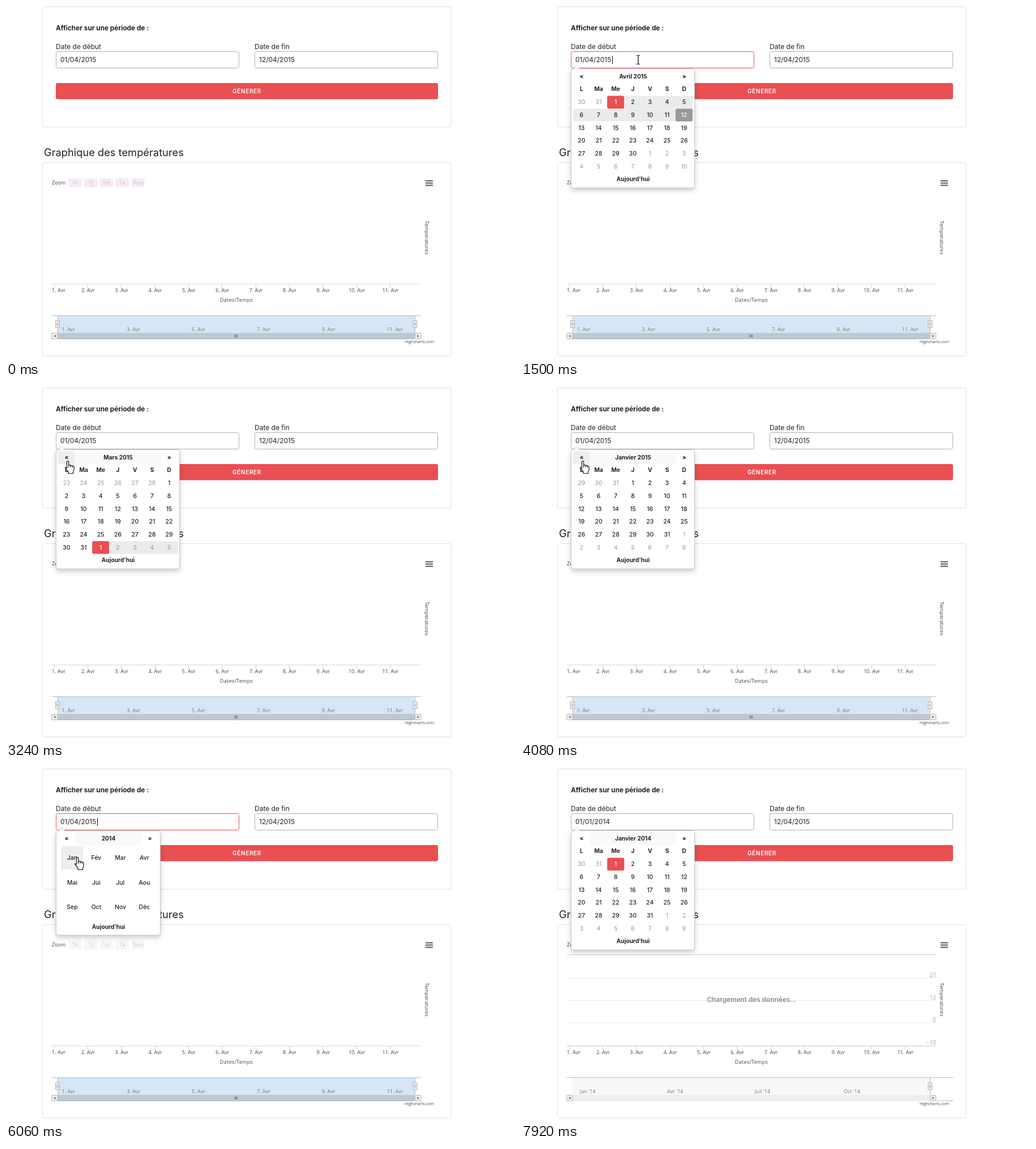
Recreate the animation shown at these times as an HTML page. Size 899x623 px, loop 8 s.

```html
<!DOCTYPE html>
<html lang="fr">
<head>
<meta charset="utf-8">
<title>Graphique des températures</title>
<style>
html, body { margin: 0; width: 100%; height: 100%; overflow: hidden; background: #fff; }
svg { display: block; font: 12px Inter, sans-serif; fill: #222; }
.mid { text-anchor: middle; }
.end { text-anchor: end; }
.bold { font-weight: 700; }
.title { font-size: 18.3px; }
.button { font-size: 10px; font-weight: 600; letter-spacing: .7px; fill: #fff; }
.chart { font: 9px "Open Sans", sans-serif; fill: #444; }
.wide { letter-spacing: .3px; }
.tiny { font-size: 7.1px; }
.nav { fill: #777; }
.value { font-size: 10px; fill: #aaa; }
.loading { font-size: 11.8px; font-weight: 600; fill: #8a8a8a; }
.day { font-size: 10.5px; font-weight: 500; }
.head { font-size: 10.2px; font-weight: 700; }
.dim { fill: #999; font-weight: 400; }
.light { fill: #fff; }
#popup { filter: drop-shadow(0 4px 4px rgba(0, 0, 0, .2)); }
</style>
</head>
<body>
<svg id="stage" width="899" height="623" viewBox="0 0 899 623">
  <g id="page"></g>
  <g id="chart"></g>
  <g id="fields"></g>
  <g id="popup"></g>
  <g id="panel"></g>
  <g id="cursor"></g>
</svg>
<script>
const LOOP = 8000, TICK = 60;
const RED = '#ea4f52', GREY = '#b0b0b0';
const layer = id => document.getElementById(id);

const text = (x, y, str, cls = '', more = '') =>
  `<text x="${x}" y="${y}" class="${cls}" ${more}>${str}</text>`;
const rect = (x, y, w, h, fill, stroke = 'none', r = 0) =>
  `<rect x="${x}" y="${y}" width="${w}" height="${h}" rx="${r}" fill="${fill}" stroke="${stroke}"/>`;
const path = (d, stroke, fill = 'none', width = 1) =>
  `<path d="${d}" stroke="${stroke}" fill="${fill}" stroke-width="${width}"/>`;
const range = n => [...Array(n).keys()];

// Timeline
const FOCUS = [[1500, 2700], [2820, 3240], [3300, 3720], [3780, 4080],
  [4200, 4860], [4980, 6240], [6360, 7140]];
// start, year, month (0 shows the twelve months)
const VIEWS = [[1500, 2015, 4], [2820, 2015, 3], [3300, 2015, 2], [3780, 2015, 1],
  [4200, 2014, 12], [4980, 2014, 0], [6360, 2014, 1]];
const PICKED = 7320, LOADED = 7740;
const POINTER = [
  [180, 885, 62], [240, 839, 82], [300, 797, 96], [360, 746, 112], [420, 690, 122],
  [540, 540, 133], [660, 390, 130], [780, 290, 122], [900, 229, 115], [960, 217, 104],
  [1020, 209, 96], [1140, 207, 95], [1800, 207, 95], [1920, 196, 110], [2100, 160, 124],
  [2340, 115, 131], [2400, 113, 131], [2520, 113, 131], [2700, 109, 130], [4440, 109, 130],
  [4740, 195, 128], [5280, 195, 128], [5640, 163, 143], [6000, 126, 157], [6660, 125, 157],
  [7140, 168, 169], [7440, 168, 169], [7500, 152, 167], [7560, 116, 159], [7620, 64, 147],
  [7680, 12, 136]];

function pointerAt(t) {
  if (t < POINTER[0][0] || t >= LOADED) return null;
  const i = POINTER.findIndex(p => p[0] > t);
  if (i < 0) return POINTER[POINTER.length - 1].slice(1);
  const [t0, x0, y0] = POINTER[i - 1], [t1, x1, y1] = POINTER[i];
  const k = (t - t0) / (t1 - t0);
  return [x0 + (x1 - x0) * k, y0 + (y1 - y0) * k];
}

function drawPage() {
  layer('page').innerHTML =
    rect(64.5, 1.5, 721.5, 212.5, '#fff', '#dfdfdf', 3) +
    rect(64.5, 276.5, 721.5, 341, '#fff', '#dfdfdf', 3) +
    text(88, 43, 'Afficher sur une période de :', 'bold', 'font-size="11.8"') +
    text(88, 76, 'Date de début') + text(439, 76, 'Date de fin') +
    rect(439.5, 80.5, 323, 29, '#fff', GREY, 3) + text(447, 99.3, '12/04/2015') +
    rect(88, 136, 675, 28.5, RED, 'none', 3) +
    text(425.5, 154, 'GÉNERER', 'button mid') +
    text(67, 265, 'Graphique des températures', 'title') +
    text(81, 315, 'Zoom', 'chart') +
    range(3).map(i => rect(741, 307.5 + i * 4, 13, 2, '#555')).join('') +
    text(0, 0, 'Temperatures', 'chart', 'transform="translate(740 379) rotate(90)" letter-spacing=".1"') +
    text(407, 522, 'Dates/Temps', 'chart wide mid') +
    text(756, 595, 'Highcharts.com', 'chart tiny end') +
    range(11).map(i => {
      const x = 85.5 + i * 59.35;
      return path(`M${Math.round(x) - .5} 490v7`, '#c0d0e0') +
        text(i ? x : 93, 505, `${i + 1}. Avr`, 'chart mid');
    }).join('');
}

function scrollButton(x, dir) {
  return rect(x + .5, 577.5, 10.5, 10, '#ebebeb', '#bbb', 1) +
    path(`M${x + 6 - dir * 1.5} 580.5v4l${dir * 3}-2z`, 'none', '#555');
}

function handle(x) {
  return rect(x - 3.5, 555.5, 7, 12, '#f1f1f1', GREY) +
    path(`M${x - 1} 558.5v6M${x + 1} 558.5v6`, '#999', 'none', .8);
}

function drawChart(t) {
  const loaded = t >= LOADED;
  const fresh = t < 4980;
  let s = ['1h', '1j', '1m', '1a', 'Tout'].map((name, i) =>
    rect(110 + i * 27.8, 304, 23.5, 16, fresh ? '#f7ebf6' : '#f7f7f7', 'none', 2) +
    text(122 + i * 27.8, 315, name, 'chart mid', `style="fill:${fresh ? '#b9c6b4' : '#c6c6c6'}"`)).join('');
  s += path('M81 490.5H733', loaded ? '#c3c8d0' : '#cfdae6');
  if (loaded) {
    s += path('M81 329.5H733', '#ccc') + path('M81 370.5H733M81 410.5H733M81 449.5H733', '#ebebeb') +
      ['20', '10', '0', '−10'].map((v, i) => text(733, 369 + i * 39.7, v, 'chart value end')).join('') +
      text(407.5, 413, 'Chargement des données...', 'loading mid',
        `opacity="${Math.min(1, (t - LOADED) / 180)}"`) +
      rect(91, 547, 631, 30, '#f8f8f8') + rect(91, 577, 631, 11, '#eee') +
      path('M81 546.5H763.5M733 587.5H763.5M722.5 547V577', '#bbb');
    s += [[104, 'Jan'], [258, 'Avr'], [413, 'Juil'], [570, 'Oct']]
      .map(([x, m]) => text(x, 574, `${m} '14`, 'chart nav')).join('');
  } else {
    s += rect(91, 547, 631, 30, '#d6e6f6') + rect(91, 577, 631, 10.5, '#bfc8d0') +
      path('M81 546.5H733M91.5 547V577M722.5 547V577', '#b4bcc4') +
      path('M91 587.5H722', '#aab2ba') + path('M404.5 580v5M406.5 580v5M408.5 580v5', '#666') +
      range(6).map(i => text(98.5 + i * 114.8, 574, `${2 * i + 1}. Avr`, 'chart nav')).join('') +
      handle(91);
  }
  layer('chart').innerHTML = s + handle(722.5) + scrollButton(80, -1) + scrollButton(722, 1);
}

function drawFields(t) {
  const focus = FOCUS.find(([a, b]) => t >= a && t < b);
  const caret = focus && (t - focus[0]) % 1000 < 500;
  layer('fields').innerHTML =
    rect(88.5, 80.5, 323, 29, '#fff', focus ? RED : GREY, 3) +
    text(96, 99.3, t < PICKED ? '01/04/2015' : '01/01/2014') +
    (caret ? path('M161.5 88v14', '#000') : '');
}

const MONTHS = ['Janvier', 'Février', 'Mars', 'Avril', 'Mai', 'Juin', 'Juillet', 'Août',
  'Septembre', 'Octobre', 'Novembre', 'Décembre'];
const SHORT = ['Jan', 'Fév', 'Mar', 'Avr', 'Mai', 'Jui', 'Jul', 'Aou', 'Sep', 'Oct', 'Nov', 'Déc'];
const DAY = 864e5, COL = 30.2, ROW = 22.7;

function dayGrid(t, year, month, over) {
  let s = ['L', 'Ma', 'Me', 'J', 'V', 'S', 'D']
    .map((d, i) => text(107 + i * COL, 150.3, d, 'head mid')).join('');
  const last = Date.UTC(year, month - 1, 0);
  const first = last - (new Date(last).getUTCDay() + 6) % 7 * DAY;
  const from = t < PICKED ? Date.UTC(2015, 3, 1) : Date.UTC(2014, 0, 1);
  const to = t < PICKED ? Date.UTC(2015, 3, 12) : from;
  for (const i of range(42)) {
    const time = first + i * DAY, date = new Date(time);
    const x = 91.8 + i % 7 * COL, y = 158.6 + Math.floor(i / 7) * ROW;
    let cls = date.getUTCMonth() === month - 1 ? '' : 'dim', fill = '', r = 0;
    if (time === from || time === to) {
      fill = time === from ? RED : '#999';
      cls = 'light';
      r = 3;
    } else if (time > from && time < to) fill = '#ebebeb';
    else if (over(x, y, COL, ROW)) { fill = '#eee'; r = 3; }
    if (fill) s += rect(x, y, COL, 22.4, fill, 'none', r);
    s += text(x + COL / 2, y + 14.7, date.getUTCDate(), 'day mid ' + cls);
  }
  return s;
}

function monthGrid(over) {
  return SHORT.map((name, i) => {
    const x = 97.3 + i % 4 * 42.5, y = 138 + Math.floor(i / 4) * 43.8;
    return (over(x, y, 39, 41) ? rect(x, y, 39, 41, '#eee', 'none', 3) : '') +
      text(x + 19.7, y + 23.8, name, 'day mid');
  }).join('');
}

function drawPopup(t, pointer) {
  const view = VIEWS.filter(v => t >= v[0]).pop();
  if (!view) {
    layer('popup').innerHTML = layer('panel').innerHTML = '';
    return;
  }
  const [, year, month] = view;
  const w = month ? 218 : 184, h = month ? 210.5 : 184.5;
  const mid = 89 + w / 2, barW = month ? 152 : 118;
  const over = (x, y, cw, ch) => pointer &&
    pointer[0] >= x && pointer[0] < x + cw && pointer[1] >= y && pointer[1] < y + ch;
  layer('popup').innerHTML = rect(88.5, 110.5, w, h, '#fff', '#c8c8c8', 4) +
    path('M93 110.5l5.5-5.5 5.5 5.5', '#ccc', '#fff');

  const bar = over(121, 113, barW, 23) ? '#eee' : t >= 2040 ? '#f9f9f9' : '';
  const label = month ? `${MONTHS[month - 1]} ${year}` : year;
  layer('panel').innerHTML =
    (bar ? rect(121.5, 113, barW, 23, bar, 'none', 3) : '') +
    (over(91, 113, 30, 23) ? rect(91.5, 113, 30, 23, '#eee', 'none', 3) : '') +
    text(107, 127.7, '«', 'head mid') + text(month ? 288.3 : 254, 127.7, '»', 'head mid') +
    text(mid, 127.7, label, 'head mid') +
    (month ? dayGrid(t, year, month, over) : monthGrid(over)) +
    text(mid, month ? 309 : 283.5, "Aujourd'hui", 'head mid');
}

const ARROW = path('M.5.5V16l3.6-3.4 2.5 5.9 2.4-1-2.5-5.8h5z', '#222', '#fff');
const BEAM = path('M-3 -7.5h2.5l.5.5.5-.5H3M0-7V7M-3 7.5h2.5L0 7l.5.5H3', '#000', 'none', 1.2);
const HAND = '<g transform="translate(-5)">' +
  path('M3.5 13V2.2a1.6 1.6 0 0 1 3.2 0V8q3-1 3.4.7 2.6-.8 3.2.8 2.9-.4 2.9 2V15q0 2-1.6 4.5v3H6.2V20Q3.5 17 1 13.2q-1-2.4 2.5-.2z',
    '#111', '#fff', 1.2) +
  path('M6.7 8v4M10.1 8.7V12M13.3 9.5V12', '#111') + '</g>';

function drawCursor(t, pointer) {
  const shape = t < 1020 ? ARROW : t < 1920 ? BEAM : HAND;
  layer('cursor').innerHTML = pointer
    ? `<g transform="translate(${Math.round(pointer[0])} ${Math.round(pointer[1])})">${shape}</g>` : '';
}

let shown = -1;
function frame(now) {
  const t = Math.floor(now % LOOP / TICK) * TICK;
  if (t !== shown) {
    shown = t;
    const pointer = pointerAt(t);
    drawChart(t);
    drawFields(t);
    drawPopup(t, pointer);
    drawCursor(t, pointer);
  }
  requestAnimationFrame(frame);
}

drawPage();
frame(performance.now());
</script>
</body>
</html>
```
